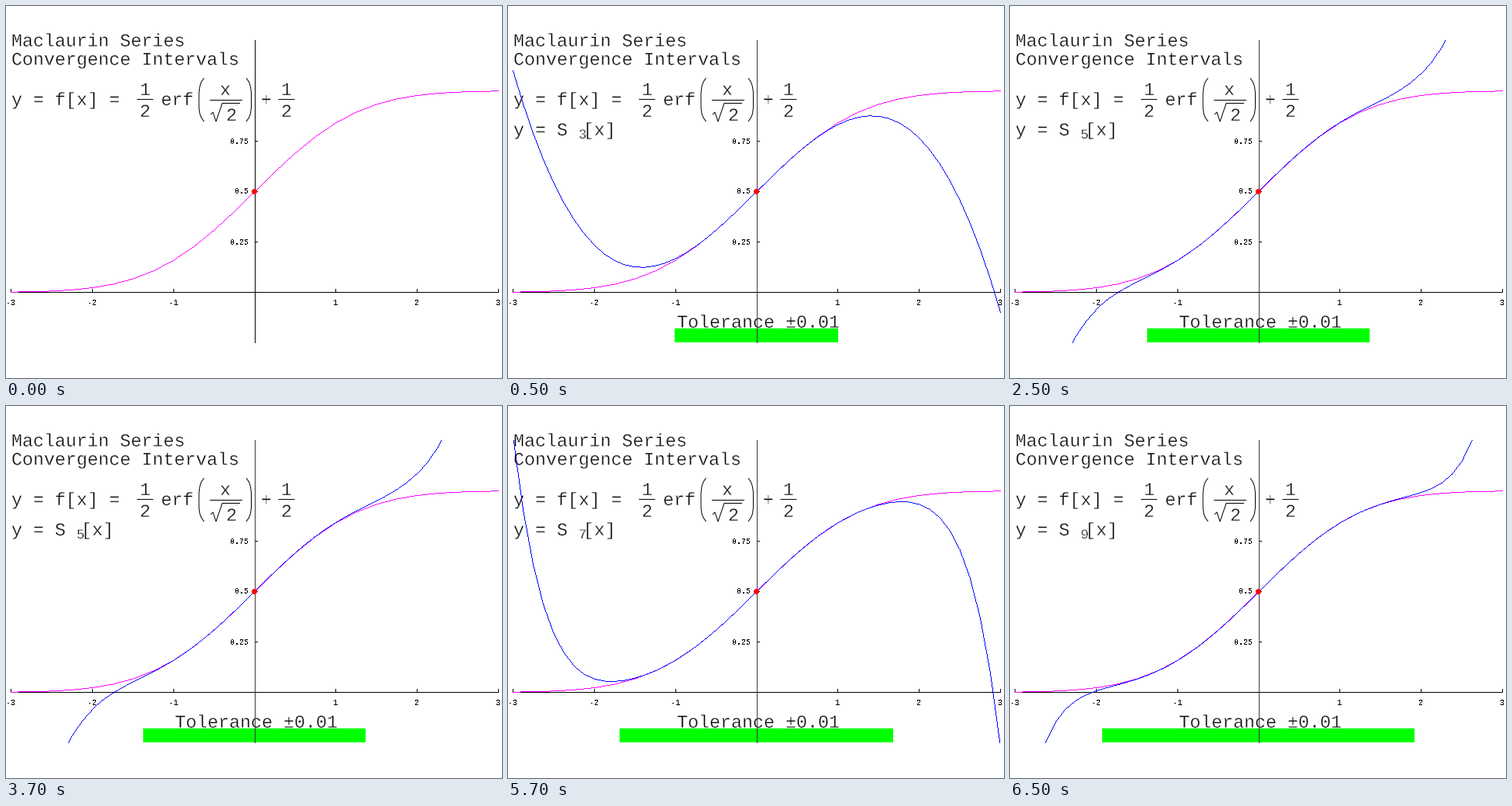
A matplotlib script that plays this animation: 640x480 px, repeating every 8 s.

```python
import math

import matplotlib.pyplot as plt
import numpy as np
from matplotlib.animation import FuncAnimation
from matplotlib.collections import PolyCollection
from matplotlib.patches import Circle, Rectangle
from matplotlib.patheffects import Normal, Stroke

PX = 0.72  # points per pixel at 100 dpi
MONO = "Liberation Mono"
INTERVAL = 500
STEPS = 16
ORDERS = (3, 5, 7, 9)
REACH = (1.006, 1.369, 1.684, 1.922)  # half-width of each convergence interval
CELL = np.array([(0, 0), (1, 0), (1, 1), (0, 1)])

fig = plt.figure(figsize=(6.4, 4.8), dpi=100, facecolor="white")
ax = fig.add_axes([0, 0, 1, 1])
ax.set_xlim(0, 640)
ax.set_ylim(480, 0)
ax.axis("off")


def to_px(x, y):
    return 321 + 104.83 * np.asarray(x), 369.5 - 260 * np.asarray(y)


def line(xs, ys, z=3):
    return ax.plot(xs, ys, color="black", lw=PX, zorder=z, snap=False,
                   solid_capstyle="butt")[0]


def write(x, baseline, text, size=23.33, ha="left"):
    """Large text, slimmed to a light typewriter weight."""
    slim = [Normal(), Stroke(linewidth=0.6 * PX, foreground="white")]
    return ax.text(x, baseline, text, family=MONO, size=size * PX, ha=ha,
                   va="baseline", zorder=2, path_effects=slim)


def label(x, baseline, text, ha="center"):
    ax.text(x, baseline, text, family=MONO, size=10 * PX, ha=ha,
            va="baseline", zorder=2, antialiased=False)


def half(center):
    write(center, 115, "1", ha="center")
    write(center, 143, "2", ha="center")
    line([center - 10.5, center + 10.5], [120.5, 120.5])


def paren(tip, direction):
    bow = np.array([0, 3.5, 5.5, 6.5, 6.5, 5.5, 3.5, 0])
    line(tip + direction * bow, [93, 98, 104, 112, 131, 139, 144, 149])


def partial_sum(x, order):
    total = np.full_like(x, 0.5)
    for n in range((order + 1) // 2):
        total += ((-1) ** n * x ** (2 * n + 1) / math.sqrt(2 * math.pi)
                  / (math.factorial(n) * 2 ** n * (2 * n + 1)))
    return total


def pixel_trail(xs, ys):
    """Unit squares along a polyline, one per pixel of its longer direction."""
    px, py = to_px(xs, ys)
    travel = np.maximum(abs(np.diff(px)), abs(np.diff(py)))
    distance = np.concatenate([[0], np.cumsum(travel)])
    t = np.arange(0, distance[-1] + 1)
    cells = np.floor(np.column_stack([np.interp(t, distance, px),
                                      np.interp(t, distance, py)]))
    cells = cells[(cells[:, 1] >= 44) & (cells[:, 1] <= 434)]
    return cells[:, None, :] + CELL


def curve(color, z):
    return ax.add_collection(PolyCollection([], facecolors=color, linewidths=0,
                                            zorder=z, snap=False),
                             autolim=False)


# Axes
line([6, 636], [369.5, 369.5])
y_axis = line([321.5, 321.5], [44, 435], z=6)
for value in (-3, -2, -1, 1, 2, 3):
    x = math.floor(float(to_px(value, 0)[0])) + 0.5
    line([x, x], [365, 369])
    label(x, 386, str(value))
for value in (0.25, 0.5, 0.75):
    y = float(to_px(0, value)[1])
    line([322, 325], [y, y])
    label(313.5, y + 3, str(value), ha="right")

# Title and formula
write(7, 52, "Maclaurin Series")
write(7, 76, "Convergence Intervals")
write(7, 128, "y = f[x] =")
half(179.5)
write(200, 128, "erf")
paren(255.5, -1)
write(283, 115, "x", ha="center")
line([263, 305], [121.5, 121.5])
line([264, 267, 271, 279, 302], [140, 137, 149, 125.5, 125.5])
write(291, 148, "2", ha="center")
paren(310, 1)
write(335.5, 128, "+", ha="center")
half(362)

# Curves
coarse = np.linspace(-3, 3, 25)
fine = np.linspace(-3, 3, 49)
normal_cdf = [0.5 + 0.5 * math.erf(x / math.sqrt(2)) for x in coarse]
curve("#ff00ff", 4).set_verts(pixel_trail(coarse, normal_cdf))
series = curve("#0000ff", 5)
ax.add_patch(Circle((320.5, 239.5), 3.5, color="#ff0000", lw=0, zorder=7))

# Parts that belong to a partial sum
bar = ax.add_patch(Rectangle((0, 416), 0, 18, color="#00ff00", lw=0, zorder=1))
subscript = write(91, 171, "", size=17.5)
extras = [series, bar, subscript, write(7, 167, "y = S"),
          write(97, 167, "[x]"), write(218, 415, "Tolerance ±0.01")]


def update(step):
    shown = step > 0
    for artist in extras:
        artist.set_visible(shown)
    y_axis.set_color("#4a3333" if shown else "black")
    if shown:
        stage = (step - 1) // 4
        series.set_verts(pixel_trail(fine, partial_sum(fine, ORDERS[stage])))
        subscript.set_text(str(ORDERS[stage]))
        reach = REACH[stage]
        left, right = np.floor(to_px([-reach, reach], 0)[0])
        bar.set_x(left)
        bar.set_width(right - left)
    return extras + [y_axis]


anim = FuncAnimation(fig, update, frames=STEPS, interval=INTERVAL,
                     repeat=True, repeat_delay=0)
plt.show()
```
